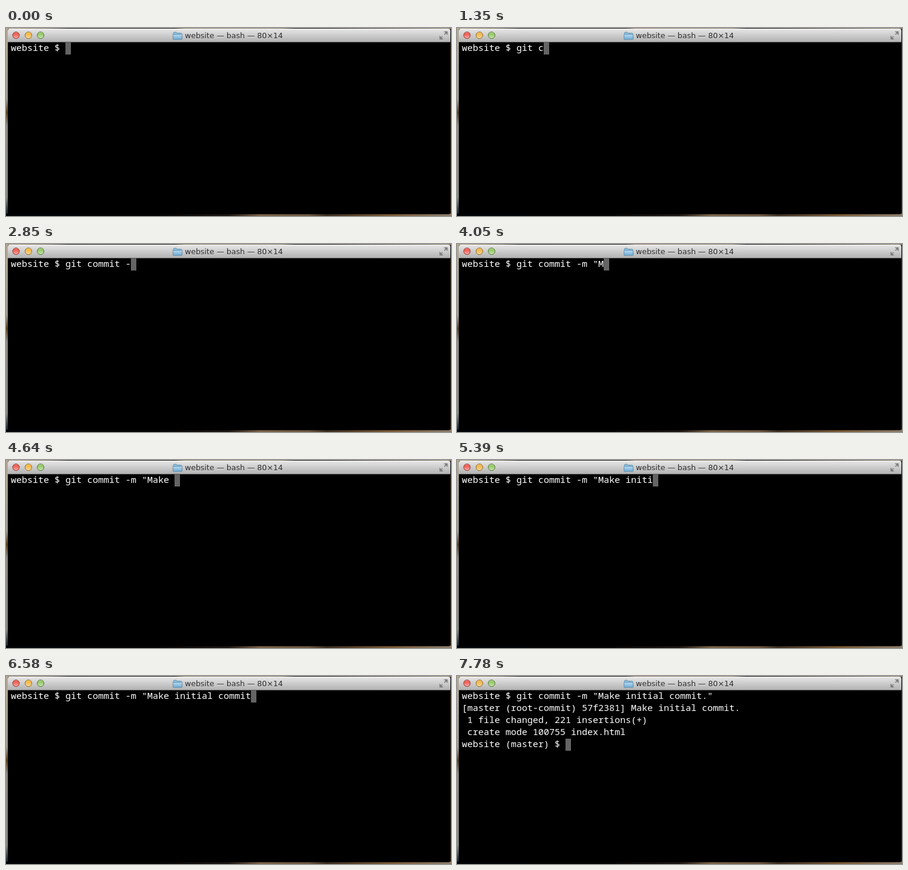
An HTML page for the animation above (8000 ms loop, 734x312 px).

```html
<!DOCTYPE html>
<html lang="en">
<head>
<meta charset="utf-8">
<title>Terminal</title>
<style>
  html, body { margin: 0; width: 734px; height: 312px; overflow: hidden; background: #000; }
  svg { display: block; }
  .title { font: 12.5px "DejaVu Sans", sans-serif; }
  .term { font: 300 15px "Noto Sans Mono", monospace; fill: #fff; }
  .term text { white-space: pre; }
</style>
</head>
<body>
<svg width="734" height="312" viewBox="0 0 734 312">
  <defs>
    <linearGradient id="bar" x2="0" y2="1">
      <stop stop-color="#e8e8e8"/><stop offset="1" stop-color="#b2b2b2"/>
    </linearGradient>
    <linearGradient id="left" x2="0" y2="1">
      <stop stop-color="#b3a894"/><stop offset=".38" stop-color="#a09a90"/>
      <stop offset=".45" stop-color="#5c4420"/><stop offset=".52" stop-color="#8f8a84"/>
      <stop offset=".9" stop-color="#8a8a88"/><stop offset="1" stop-color="#0b1a26"/>
    </linearGradient>
    <linearGradient id="top">
      <stop stop-color="#a8977c"/><stop offset=".1" stop-color="#6e5c46"/>
      <stop offset=".14" stop-color="#15120f"/><stop offset=".26" stop-color="#1a1612"/>
      <stop offset=".38" stop-color="#1a1612"/><stop offset=".4" stop-color="#8d7a5e"/>
      <stop offset=".62" stop-color="#85745c"/><stop offset=".65" stop-color="#0c0a09"/>
      <stop offset=".72" stop-color="#1c1713"/><stop offset="1" stop-color="#85745c"/>
    </linearGradient>
    <linearGradient id="bottom">
      <stop stop-color="#030507"/><stop offset=".34" stop-color="#050505"/>
      <stop offset=".5" stop-color="#1a1511"/><stop offset=".57" stop-color="#7a6146"/>
      <stop offset=".68" stop-color="#6b563f"/><stop offset=".72" stop-color="#3a2c20"/>
      <stop offset=".86" stop-color="#7a5834"/><stop offset="1" stop-color="#8a7c6a"/>
    </linearGradient>
    <linearGradient id="gloss" x2="0" y2="1">
      <stop stop-color="#fff" stop-opacity=".3"/><stop offset=".3" stop-color="#fff" stop-opacity="0"/>
      <stop offset="1" stop-color="#fff" stop-opacity=".5"/>
    </linearGradient>
    <linearGradient id="folder" x2="0" y2="1">
      <stop stop-color="#b5dcf2"/><stop offset="1" stop-color="#72a9cf"/>
    </linearGradient>
  </defs>

  <rect width="734" height="2" fill="url(#top)"/>
  <rect width="3" height="312" fill="url(#left)"/>
  <rect y="308" width="734" height="4" fill="url(#bottom)"/>
  <rect x="733" y="24" width="1" height="284" fill="#3a2c1c"/>
  <path d="M3 23H733V306a3 3 0 0 1-3 3H6a3 3 0 0 1-3-3Z"/>
  <path d="M3 23V5a4 4 0 0 1 4-4H729a4 4 0 0 1 4 4V23Z" fill="url(#bar)"/>
  <path d="M7 1.5H729" stroke="#f6f6f6"/>
  <path d="M3 23.5H733" stroke="#555"/>

  <g id="lights"></g>

  <g stroke="#5486a8" stroke-width=".8">
    <path d="M276 8.5q0-1.5 1.5-1.5h3.5l1.5 1.5h6q1.5 0 1.5 1.5v8.5h-14Z" fill="#8fc0de"/>
    <rect x="275.5" y="10.5" width="15" height="8.5" rx="1" fill="url(#folder)"/>
  </g>
  <g class="title">
    <text x="295" y="18" fill="#fff" opacity=".45">website — bash — 80×14</text>
    <text x="295" y="17" fill="#262626">website — bash — 80×14</text>
  </g>
  <g fill="#808080" stroke="#808080" stroke-width="1.6">
    <path d="M723 11L727 7M720 14L716 18" fill="none"/>
    <path d="M722 5.5h6.5v6.5ZM715 12.5v6.5h6.5Z" stroke="none"/>
  </g>

  <rect id="cursor" width="9" height="20" fill="#646464"/>
  <g class="term" id="lines"></g>
</svg>
<script>
const LOOP = 8000, TICK = 149.5, CELL = 9, LINE = 20, LEFT = 8, TOP = 24;
const PROMPT = 'website $ ';
const COMMAND = 'git commit -m "Make initial commit."';
const OUTPUT = [
  '[master (root-commit) 57f2381] Make initial commit.',
  ' 1 file changed, 221 insertions(+)',
  ' create mode 100755 index.html',
  'website (master) $ '
];
const DONE = 52;

// Bursts of typing: first tick, then characters added at each tick.
const BURSTS = [
  [4, '1111'], [9, '11'], [12, '11111'], [19, '1'], [21, '11'], [25, '1'],
  [27, '11111'], [33, '1121121'], [40, '11'], [43, '12'], [47, '1'], [49, '1']
];
const keys = BURSTS.flatMap(([start, counts]) =>
  [...counts].map((n, i) => ({ tick: start + i, n: +n })));

const $ = id => document.getElementById(id);

$('lights').innerHTML = [[16.5, '#ee5a50', '#8f3630'], [37, '#f3b544', '#92692a'], [57, '#92c863', '#55793a']]
  .map(([x, fill, edge]) =>
    `<circle cx="${x}" cy="12" r="5.5" fill="${fill}" stroke="${edge}"/>
     <circle cx="${x}" cy="12" r="5" fill="url(#gloss)"/>`).join('');

const rows = Array.from({ length: OUTPUT.length + 1 }, (_, i) => {
  const row = document.createElementNS('http://www.w3.org/2000/svg', 'text');
  row.setAttribute('x', LEFT);
  row.setAttribute('y', TOP + 14 + i * LINE);
  return $('lines').appendChild(row);
});

function draw(now) {
  const tick = (now % LOOP) / TICK;
  const typed = keys.reduce((sum, key) => sum + (tick >= key.tick ? key.n : 0), 0);
  const lines = [PROMPT + COMMAND.slice(0, typed), ...(tick >= DONE ? OUTPUT : [])];
  rows.forEach((row, i) => {
    const text = lines[i] || '';
    if (row.textContent !== text) row.textContent = text;
  });
  const last = lines.length - 1;
  $('cursor').setAttribute('x', LEFT + lines[last].length * CELL);
  $('cursor').setAttribute('y', TOP + last * LINE);
  requestAnimationFrame(draw);
}
draw(performance.now());
</script>
</body>
</html>
```
